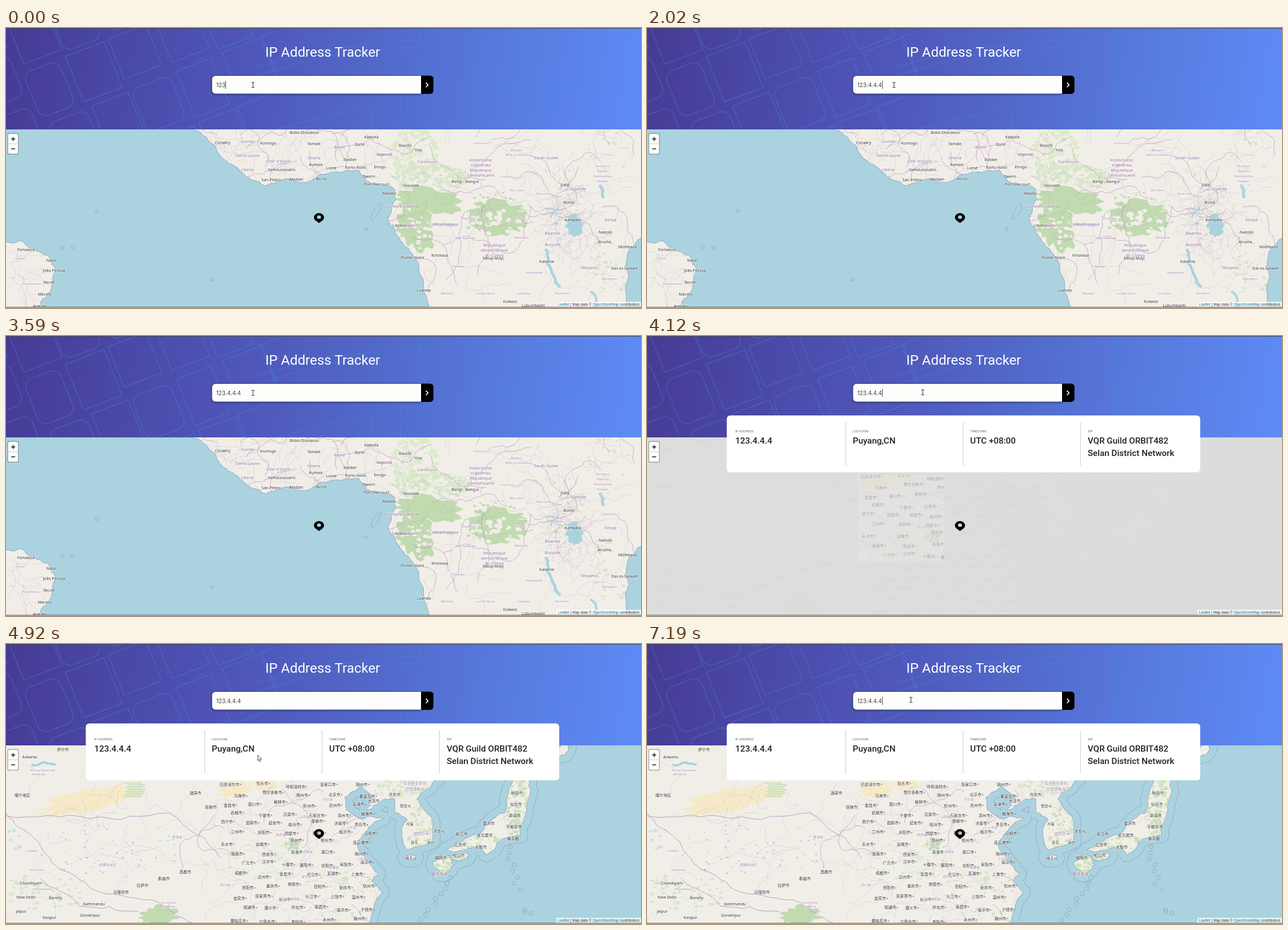
Recreate the animation shown at these times as an HTML page with a canvas. Size 1126 px wide and 497 px high, loop 8 s.

```html
<!DOCTYPE html>
<html lang="en">
<meta charset="utf-8">
<title>IP Address Tracker</title>
<style>
html, body { margin: 0; width: 1126px; height: 497px; overflow: hidden; }
canvas { display: block; }
</style>
<canvas id="stage" width="1126" height="497"></canvas>
<script>
const W = 1126, H = 497, MAP_TOP = 180, LOOP = 8000;
const WATER = '#aad3df', LAND = '#f1eee8', FOREST = '#c1dab0', MEADOW = '#d8e7ca', SAND = '#f5e9c8';
const UI = 'Roboto, sans-serif', MAP_FONT = ' "Noto Sans", "Noto Sans CJK SC", sans-serif';
const KINDS = {
  city: ['7px', '#333'],
  country: ['7.3px', '#8f6a9d'],
  area: ['italic 6px', '#a585b0']
};
let g, seed = 7;

const rnd = () => (seed = (seed * 16807) % 2147483647) / 2147483647;
const around = r => (rnd() * 2 - 1) * r;

function layer(draw) {
  const canvas = document.createElement('canvas');
  canvas.width = W;
  canvas.height = H;
  g = canvas.getContext('2d');
  draw();
  return canvas;
}

function stroke(path, color, width) {
  g.strokeStyle = color;
  g.lineWidth = width;
  g.stroke(path);
}

function fill(path, color) {
  g.fillStyle = color;
  g.fill(path);
}

function rect(x, y, w, h, color, r = 0) {
  const path = new Path2D();
  path.roundRect(x, y, w, h, r);
  fill(path, color);
}

// Key points joined by a naturally uneven line
function rough(keys, closed) {
  let list = keys.split(' ').map(p => p.split(',').map(Number));
  if (closed) list.push(list[0]);
  for (let depth = 0; depth < 3; depth++) {
    list = list.flatMap(([x, y], i) => {
      if (!i) return [[x, y]];
      const [px, py] = list[i - 1], dx = x - px, dy = y - py;
      const k = around(.14) * Math.min(1, 30 / Math.hypot(dx, dy));
      return [[px + dx / 2 + dy * k, py + dy / 2 - dx * k], [x, y]];
    });
  }
  const path = new Path2D();
  list.forEach(([x, y]) => path.lineTo(x, y));
  if (closed) path.closePath();
  return path;
}

function blob(x, y, rx, ry, tilt = 0) {
  const path = new Path2D(), n = rx < 8 ? 9 : 36;
  for (let i = 0; i < n; i++) {
    const a = i / n * 2 * Math.PI, r = .85 + around(.2);
    const u = Math.cos(a) * rx * r, v = Math.sin(a) * ry * r;
    path.lineTo(x + u * Math.cos(tilt) - v * Math.sin(tilt), y + u * Math.sin(tilt) + v * Math.cos(tilt));
  }
  path.closePath();
  return path;
}

function spots(n, x, y, rx, ry, size, color) {
  for (let i = 0; i < n; i++) {
    const a = rnd() * 6.28, d = Math.sqrt(rnd()), s = size * (.3 + rnd());
    fill(blob(x + Math.cos(a) * d * rx, y + Math.sin(a) * d * ry, s, s * .7), color);
  }
}

// Wandering borders inside a box
function borders(n, x, y, w, h, step, width) {
  for (let i = 0; i < n; i++) {
    const path = new Path2D();
    let px = x + rnd() * w, py = y + rnd() * h, a = rnd() * 6.28;
    for (let k = 0; k < 16; k++) {
      path.lineTo(px, py);
      a += around(.75);
      px += Math.cos(a) * step;
      py += Math.sin(a) * step;
    }
    stroke(path, `rgba(160,125,168,${width * .55})`, width);
  }
}

function islands(n, x0, y0, x1, y1, r) {
  for (let i = 0; i < n; i++) {
    const path = new Path2D(), k = i / (n - 1 || 1);
    path.arc(x0 + (x1 - x0) * k + around(n > 2 ? 6 : 0), y0 + (y1 - y0) * k, r, 0, 7);
    stroke(path, '#8ea0c4', .8);
  }
}

function write(text, x, y, font, color, align = 'left') {
  g.font = font;
  g.textAlign = align;
  g.fillStyle = color;
  g.fillText(text, x, y);
}

// Place names spread evenly from one point to another
function along(names, x0, y0, x1 = x0, y1 = y0, kind = 'city', drift = 0) {
  const [size, color] = KINDS[kind];
  names.split('|').forEach((name, i, all) => {
    const k = i / (all.length - 1 || 1);
    const x = x0 + (x1 - x0) * k + around(drift), y = y0 + (y1 - y0) * k + 2.5 + around(drift);
    g.font = size + MAP_FONT;
    g.textAlign = 'center';
    g.lineWidth = 1.6;
    g.strokeStyle = 'rgba(255,255,255,.6)';
    g.strokeText(name, x, y);
    write(name, x, y, size + MAP_FONT, color, 'center');
    if (drift && kind === 'city') rect(x + g.measureText(name).width / 2 + 1, y - 3.5, 2, 2, '#888');
  });
}

function rows(text, x0, y0, x1, y1, kind) {
  text.split('/').forEach((names, i, all) => {
    const y = y0 + (y1 - y0) * i / (all.length - 1);
    along(names, x0 + i % 2 * 16, y, x1 + i % 2 * 16, y, kind, 4);
  });
}

// Sea and coasts, with an optional outline of the coastal zone; later drawing stays on land
function terrain(land, zone) {
  rect(0, MAP_TOP, W, H, WATER);
  g.lineJoin = 'round';
  if (zone) {
    stroke(land, '#a899bd', zone);
    stroke(land, WATER, zone - 1.6);
  }
  stroke(land, '#93a3c0', 1.8);
  fill(land, LAND);
  g.save();
  g.clip(land);
}

const africa = layer(() => {
  const land = rough('333,170 333,181 357,196 372,210 385,232 425,262 457,279 490,269 530,274 575,256 625,252 640,272 668,279 688,284 692,305 678,342 700,378 732,418 741,450 748,505 1108,505 1099,478 1104,440 1097,425 1104,395 1140,362 1140,170', true);
  land.addPath(rough('-9,376 25,378 55,397 77,408 88,430 75,470 50,505 -9,505', true));
  terrain(land);
  spots(130, 725, 222, 42, 45, 5, '#dcebc9');
  spots(130, 755, 265, 70, 25, 5, MEADOW);
  fill(blob(750, 306, 68, 26, .1), FOREST);
  fill(blob(728, 355, 36, 45, -.5), FOREST);
  fill(blob(872, 338, 62, 34, .1), FOREST);
  spots(40, 730, 365, 40, 30, 4, LAND);
  spots(50, 875, 352, 65, 30, 6, LAND);
  spots(60, 872, 330, 70, 38, 4, FOREST);
  spots(45, 985, 310, 40, 70, 3, MEADOW);
  spots(45, 1075, 420, 45, 60, 4, MEADOW);
  spots(30, 1075, 230, 45, 50, 3, MEADOW);
  borders(50, 340, 181, 290, 90, 5, .6);
  borders(95, 620, 181, 500, 310, 5, .6);
  borders(60, 970, 280, 60, 110, 4, .6);
  borders(16, 0, 380, 85, 115, 5, .6);
  borders(12, 360, 185, 330, 70, 7, 1);
  borders(22, 700, 190, 420, 290, 9, 1);
  fill(blob(1008, 350, 17, 21), WATER);
  stroke(rough('957,392 960,418 970,438 983,460'), WATER, 5);
  stroke(rough('1036,468 1050,495'), WATER, 4);
  stroke(rough('1053,278 1059,302'), WATER, 5);
  stroke(rough('966,337 980,318'), WATER, 3);
  g.restore();
  islands(2, 100, 390, 118, 390, 2.8);
  islands(2, 161, 325, 365, 446, 2.8);
  islands(1, 638, 357, 638, 357, 2.8);
  const zone = new Path2D();
  zone.ellipse(656, 326, 4.5, 16, .5, 0, 7);
  stroke(zone, '#8ea0c4', .8);

  along('Conakry|Korhogo|Tamale|Ilorin|Bauchi', 384, 203, 708, 208);
  along('Yamoussoukro|Kumasi|Ibadan|Makurdi|Yola', 489, 251, 731, 216);
  along('San-Pédro|Abidjan|Accra', 470, 269, 559, 267);
  along('Lomé|Porto-Novo|Enugu', 577, 248, 663, 246);
  along('Owerri|Port Harcourt', 643, 263, 657, 277);
  along('Bobo-Dioulasso|Kaduna', 529, 185, 648, 193);
  along('Malabo|Libreville|Pointe-Noire|Luanda', 680, 293, 741, 465);
  along('Yaoundé|Bangî - Bangui', 718, 279, 814, 272);
  along('Kinshasa|Mbuji-Mayi|Kalemie', 769, 403, 959, 414);
  along('Kolwezi|Lubumbashi', 894, 485, 935, 492);
  along('Juba|Bunia|Kampala', 991, 278, 1005, 340);
  along('Nairobi|Arusha', 1063, 362, 1061, 379);
  along('Mombasa|Dar es-Salaam', 1102, 388, 1097, 426);
  along('Fortaleza|Natal', 35, 393, 80, 412);
  along('João Pessoa|Recife|Maceió|Aracaju', 85, 430, 60, 493);
  along('Guinée|Sierra Leone|Liberia', 429, 201, 428, 251, 'country');
  along("Côte d'Ivoire|Ghana", 483, 236, 546, 230, 'country');
  along('Bénin|Nigeria|Cameroon', 592, 211, 747, 237, 'country');
  along('Guinea Ecuatorial|Gabon', 702, 316, 718, 350, 'country');
  along('Ködörösêse|tî Bêafrîka|République|Centrafricaine', 842, 234, 842, 261, 'country');
  along('Congo|République|démocratique|du Congo', 779, 348, 779, 348, 'none' in KINDS ? 'none' : 'country');
  along('République|démocratique|du Congo', 866, 385, 866, 403, 'country');
  along('South Sudan|Uganda|Kenya', 958, 230, 1072, 340, 'country');
  along('Rwanda|Burundi', 969, 364, 969, 384, 'country');
  along('Tanzania', 1034, 425, 1034, 425, 'country');
  along('Western|Bahr el Ghazal', 905, 216, 905, 224, 'area');
  along('Southern|Nations|Nationalities|Peoples', 1058, 244, 1058, 271, 'area');
  along('Bas-Uele|Haut-Uele', 905, 287, 953, 293, 'area');
  along('Équateur|Tshopo', 822, 337, 910, 337, 'area');
  along('Mai-Ndombe|Maniema', 815, 372, 914, 371, 'area');
  along('Kwango|Tanganyika|Morogoro', 803, 422, 1070, 444, 'area');
  along('Malanje|Lunda Norte|Lualaba|Northern', 782, 470, 986, 470, 'area');
  along('Ceará|Pernambuco', 25, 408, 45, 453, 'area');
});

const eastAsia = layer(() => {
  const land = rough('-9,170 780,170 765,240 728,275 757,318 757,350 712,365 703,325 712,312 690,298 690,275 668,276 640,295 652,272 628,250 600,272 603,295 625,310 668,310 632,338 620,355 640,385 660,408 648,420 667,440 640,505 -9,505', true);
  land.addPath(rough('780,365 815,345 840,340 862,312 885,300 900,240 927,240 930,262 910,325 912,340 870,352 852,374 840,362 800,368', true));
  land.addPath(blob(776, 391, 18, 19, .4));
  land.addPath(blob(805, 378, 18, 7, -.15));
  land.addPath(blob(718, 379, 11, 4.5));
  land.addPath(blob(988, 188, 14, 9, -.8));
  terrain(land, 27);
  fill(blob(148, 278, 104, 24, -.22), SAND);
  fill(blob(405, 258, 32, 18), SAND);
  fill(blob(458, 248, 24, 14), SAND);
  for (let y = 246; y < 272; y += 3) rect(208 + rnd() * 8, y, 32, 1.2, '#b9d6a5');
  spots(70, 735, 325, 24, 45, 4, '#cfe4bd');
  spots(110, 905, 290, 22, 55, 4, '#cbe3b8');
  spots(100, 830, 362, 65, 26, 4, '#cbe3b8');
  spots(40, 775, 390, 18, 20, 4, '#cbe3b8');
  spots(30, 507, 355, 14, 10, 4, FOREST);
  spots(75, 590, 445, 75, 50, 4, MEADOW);
  spots(80, 465, 385, 75, 35, 4, '#dfebd1');
  spots(70, 700, 257, 50, 18, 4, MEADOW);
  spots(80, 60, 440, 90, 30, 4, MEADOW);
  fill(blob(272, 482, 40, 21, -.1), FOREST);
  spots(110, 180, 365, 140, 50, 2, WATER);
  spots(14, 15, 345, 25, 28, 4, '#c8e1ea');
  stroke(rough('45,214 68,210 88,214'), WATER, 4);
  borders(75, 350, 242, 320, 250, 5, .6);
  borders(30, 0, 181, 350, 310, 6, .6);
  borders(20, 780, 250, 145, 120, 4, .6);
  borders(8, 705, 290, 50, 65, 4, .6);
  borders(8, 360, 250, 260, 220, 9, 1);
  stroke(rough('0,300 50,345 95,400 165,440 270,458 330,495'), '#b99dbc', 1);
  stroke(rough('60,415 130,465 235,475'), '#b99dbc', 1);
  stroke(rough('0,305 150,310 290,300 380,380'), '#b99dbc', 1);
  g.restore();
  islands(9, 788, 415, 738, 490, 4);
  islands(8, 892, 360, 908, 436, 3.5);
  islands(3, 914, 472, 932, 478, 3.5);

  rows('巴彦淖尔市|包头市|呼和浩特市|张家口市|锦州市/乌海市|鄂尔多斯市|朔州市|北京市|秦皇岛市/金昌市|银川市|榆林市|忻州市|沧州市|天津市/武威市|宁夏市|吕梁市|石家庄市|滨州市|威海市/西宁市|固原市|延安市|临汾市|邯郸市|济南市|青岛市/兰州市|庆阳市|鹤壁市|濮阳市|临沂市|日照市/天水市|运城市|郑州市|徐州市|连云港市', 395, 250, 628, 352);
  rows('陇南市|西安市|商洛市|周口市|宿州市/广元市|汉中市|十堰市|襄阳市|信阳市|阜阳市|南京市/成都市|达州市|宜昌市|武汉市|芜湖市|上海市/资阳市|重庆市|常德市|岳阳市|安庆市|杭州市/宜宾市|张家界市|长沙市|九江市|上饶市|温州市/昭通市|遵义市|怀化市|南昌市|南平市|宁德市/攀枝花市|六盘水市|贵阳市|永州市|赣州市', 412, 370, 625, 490);
  along('酒泉市|张掖市', 336, 264, 363, 289);
  along('日喀则市|拉萨市|那曲市|昌都市', 204, 440, 318, 404);
  along('大连市|丹东市', 652, 278, 689, 267);
  along('秋田市|仙台市|新潟市|宇都宮市|東京都', 906, 264, 899, 345);
  along('金沢市|名古屋市|大阪市', 856, 318, 842, 360);
  along('松江市|広島市|松山市', 808, 337, 803, 375);
  along('평양시|서울|광주', 708, 287, 724, 352);
  along('포항시|부산', 768, 332, 753, 352);
  along('제주시|福岡市', 718, 380, 771, 379);
  along('Алматы|伊宁市', 42, 200, 101, 187);
  along('喀什地区', 29, 268);
  along('Chandigarh|New Delhi|Jaipur', 44, 424, 27, 474);
  along('Bareilly|Kathmandu', 88, 450, 156, 461);
  along('Kanpur|Gorakhpur', 77, 485, 149, 481);
  along('조선민주주의|인민공화국', 725, 247, 725, 257, 'country');
  along('대한민국|鹿児島県', 736, 336, 769, 408, 'country');
  along('Иссык-Кульская|область', 65, 223, 58, 230, 'area');
  along('青海省|西藏自治区', 303, 342, 180, 391, 'area');
  along('河北省|山西省|陕西省', 570, 275, 487, 338, 'area');
  along('山东省|河南省', 612, 325, 535, 368, 'area');
  along('江苏省|安徽省|湖北省', 630, 381, 532, 412, 'area');
  along('四川省|湖南省', 388, 427, 511, 452, 'area');
  along('Ladakh|Himachal|Uttarakhand', 46, 366, 64, 434, 'area');
  along('Arunachal|Pradesh', 289, 458, 289, 465, 'area');
});

const header = layer(() => {
  const shade = g.createLinearGradient(0, 0, 1110, 155);
  ['#463b94', '#4b49a8', '#4f58ba', '#526acb', '#587bdf', '#5e8af5'].forEach((c, i) => shade.addColorStop(i / 5, c));
  rect(0, 0, W, MAP_TOP, shade);
  const line = 'rgba(66,145,225,.4)';
  g.save();
  g.beginPath();
  g.rect(0, 0, 480, MAP_TOP);
  g.clip();
  g.transform(1, -.38, .4, 1, -90, 0);
  for (let u = 0; u < 560; u += 78) {
    for (let v = -20; v < 420; v += 92) {
      const block = new Path2D();
      block.roundRect(u + around(6), v + u % 40, 66 + around(5), 78 + around(8), rnd() < .2 ? 14 : 1);
      stroke(block, line, 1.2);
    }
  }
  g.restore();
  const roads = new Path2D('M440 70L560 38 736 20M446 84L564 50 736 32M478 180L648 138V180M660 180V122L700 118V180M836 98L1126 90M836 104L1126 97');
  for (const x of [735, 742, 828, 836]) roads.rect(x, -1, 0, MAP_TOP + 1);
  for (const inset of [0, 10]) {
    roads.rect(905 + inset, 110 + inset, 60 - inset * 2, 45 - inset * 2);
    roads.rect(920 + inset, -1, 48 - inset * 2, 39 - inset);
  }
  stroke(roads, line, 1.2);
  write('IP Address Tracker', 561.5, 50.5, '24.3px ' + UI, '#fff', 'center');
  g.shadowColor = 'rgba(20,20,50,.75)';
  g.shadowBlur = 4;
  g.shadowOffsetY = 1;
  rect(365.5, 85, 371, 31.5, '#fdfdfb', [6, 0, 0, 6]);
  g.shadowColor = 'transparent';
  rect(736, 84.5, 22, 32.5, '#000', [0, 6, 6, 0]);
  stroke(new Path2D('M744.6 97.2L748.4 101 744.6 104.8'), '#fff', 1.7);
});

const overlay = layer(() => {
  const pin = new Path2D('M555 346.3L548.3 341.2A9 7.6 0 1 1 561.7 341.2Z');
  pin.ellipse(555, 335.8, 3.6, 3, 0, 0, 7);
  g.fillStyle = '#000';
  g.fill(pin, 'evenodd');
  rect(2.5, 186.5, 20, 38, 'rgba(90,90,90,.55)', 3);
  rect(3.7, 187.7, 17.6, 35.6, '#fff', 2);
  rect(3.7, 205, 17.6, 1, '#ccc');
  stroke(new Path2D('M9.2 197H16.2M12.7 193.5V200.5M9.2 214.5H16.2'), '#111', 1.4);
  rect(976, 486, 150, 9, 'rgba(255,255,255,.7)');
  let x = 979;
  ['Leaflet', ' | Map data © ', 'OpenStreetMap', ' contributors'].forEach((text, i) => {
    write(text, x, 493, '6.6px "Liberation Sans", sans-serif', i % 2 ? '#333' : '#0078a8');
    x += g.measureText(text).width;
  });
  rect(0, 0, W, 1, '#44444c');
  rect(0, 495, W, 1, '#555');
  rect(0, 496, W, 1, '#dedede');
});

const card = layer(() => {
  rect(141.5, 141, 839.5, 101, '#fff', 6);
  [['IP ADDRESS', '123.4.4.4'], ['LOCATION', 'Puyang,CN'], ['TIMEZONE', 'UTC +08:00'],
    ['ISP', 'VQR Guild ORBIT482', 'Selan District Network']].forEach(([name, ...lines], i) => {
    const x = 156.5 + i * 208.3;
    write(name, x, 171, '5.9px ' + UI, '#666');
    lines.forEach((line, k) => write(line, x, 190.5 + k * 22, '500 15.4px ' + UI, '#222'));
    if (i) rect(Math.round(x - 13), 153, 1, 77, '#ccc');
  });
});

const FOUND = 4120, STEP = 133.4;
const KEYS = [530, 830, 1110, 1360, 1770, 2020];
// Step number, x, y
const WAY = [[0, 489, 100], [1, 571.5, 92.5], [4, 579, 100], [5, 575, 127], [6, 446, 197], [7, 289, 216],
  [9, 319, 219], [10, 415, 219], [12, 544, 232], [14, 564, 219], [16, 743, 215], [21, 468, 99]];

function pointerAt(t) {
  if (t < FOUND) return [438, 101];
  const step = Math.floor((t + 15 - FOUND) / STEP);
  const i = WAY.findIndex(([k]) => k >= step);
  if (i < 0) return WAY.at(-1).slice(1);
  const [k1, x1, y1] = WAY[i], [k0, x0, y0] = WAY[i - 1] || [-1, x1, y1];
  const f = (step - k0) / (k1 - k0);
  return [x0 + (x1 - x0) * f, y0 + (y1 - y0) * f];
}

function drawPointer([x, y]) {
  g.save();
  g.translate(x, y);
  if (x > 365 && x < 736 && y < 117) {
    stroke(new Path2D('M-2.5 -4.5H-.6L0 -4 .6 -4.5H2.5M0 -4V4M-2.5 4.5H-.6L0 4 .6 4.5H2.5'), '#222', 1);
  } else {
    const arrow = new Path2D('M.5 .5V10L2.6 8 4.2 11.5 5.8 10.8 4.3 7.4H7.2z');
    fill(arrow, '#fff');
    stroke(arrow, '#222', .8);
  }
  g.restore();
}

// Steady while typing or after the last click, blinking between
const caretOn = t => t < 2610 || t >= 7190 || (t - 1980) % 1070 < 520;

const screen = document.getElementById('stage').getContext('2d');

function frame(now) {
  const t = now % LOOP;
  g = screen;
  rect(0, 0, W, H, '#ddd');
  if (t < FOUND) {
    g.drawImage(africa, 0, 0);
  } else {
    const loading = t < 4260;
    g.globalAlpha = loading ? .05 : t < 4390 ? .8 : 1;
    g.drawImage(eastAsia, 0, 0);
    if (loading) {
      g.globalAlpha = .3;
      g.drawImage(eastAsia, 373, 247, 154, 153, 373, 247, 154, 153);
    }
    g.globalAlpha = 1;
  }
  g.drawImage(header, 0, 0);
  g.drawImage(overlay, 0, 0);
  if (t >= FOUND) g.drawImage(card, 0, 0);

  const typed = '123.4.4.4'.slice(0, 3 + KEYS.filter(key => key <= t).length);
  write(typed, 372.7, 104.7, '10.1px Inter, sans-serif', '#444');
  if (caretOn(t)) rect(Math.min(418, Math.round(372.7 + g.measureText(typed).width)), 94, 1, 14, '#444');
  drawPointer(pointerAt(t));
  requestAnimationFrame(frame);
}
requestAnimationFrame(frame);
</script>
</html>
```
